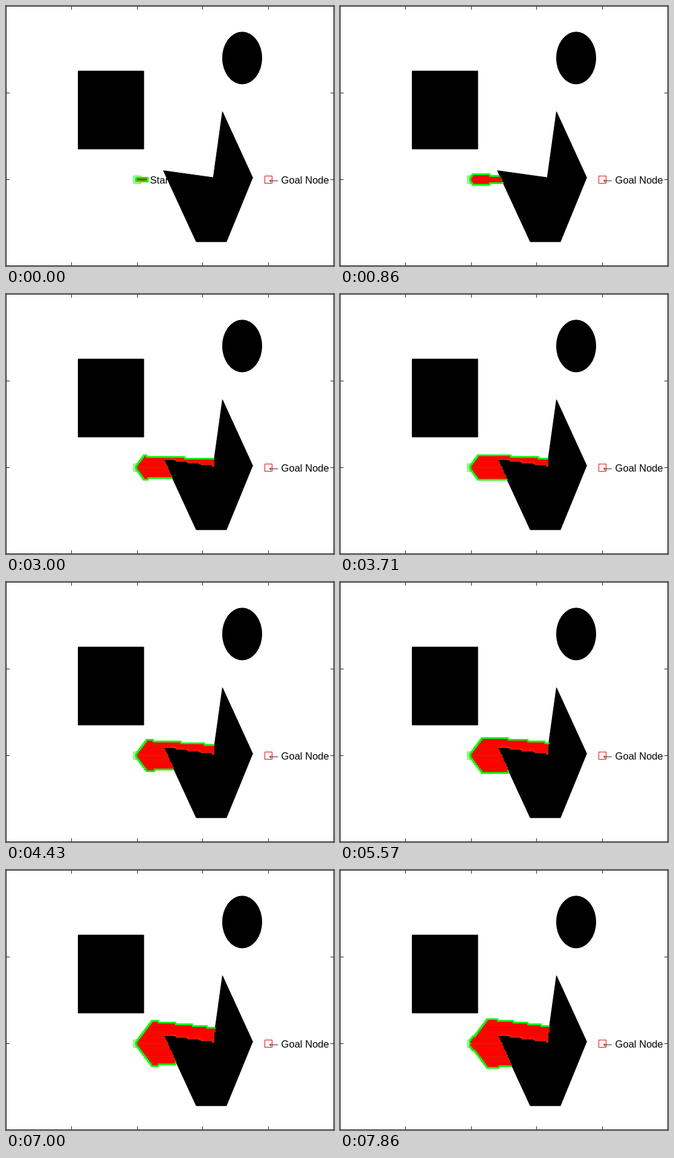
Recreate the animation shown at these times as an HTML page with a canvas. Size 543 by 429 pixels, loop 8 s.

```html
<!DOCTYPE html>
<html>
<head>
<meta charset="utf-8">
<style>
  html, body { margin: 0; width: 100%; height: 100%; overflow: hidden; background: #fff; }
  canvas { display: block; }
</style>
</head>
<body>
<canvas id="stage" width="543" height="429"></canvas>
<script>
const ctx = document.getElementById('stage').getContext('2d');
const W = 543, H = 429, COLS = 250, ROWS = 150;
const LOOP = 8000, FPS = 7, FIRST_NODES = 8, NODES_PER_SECOND = 100;
const RED = '#f00', GREEN = '#0f0', INK = '#262626';
const start = [100, 50], goal = [200, 50];

// The concave obstacle as two convex parts, clockwise with y up.
const parts = [
  [[120, 55], [158, 51], [168, 14], [145, 14]],
  [[158, 51], [165, 89], [188, 51], [168, 14]]
];

const px = x => x * W / COLS;
const py = y => H - y * H / ROWS;

function blocked(x, y) {
  return parts.some(part => part.every(([ax, ay], i) => {
    const [bx, by] = part[(i + 1) % part.length];
    return (bx - ax) * (y - ay) - (by - ay) * (x - ax) < 0;
  }));
}

// A* on an 8-connected grid with unit step cost; returns nodes in order of
// expansion, each with the neighbours it discovers.
function search(limit) {
  const makeNode = (x, y, g) =>
    ({ x, y, g, f: g + Math.hypot(goal[0] - x, goal[1] - y), found: [] });
  const root = makeNode(...start, 0);
  const seen = new Map([[start.join(), root]]);
  const open = [root], expanded = [];
  while (open.length && expanded.length < limit) {
    let best = 0;
    open.forEach((n, i) => { if (n.f < open[best].f - 1e-9) best = i; });
    const node = open.splice(best, 1)[0];
    expanded.push(node);
    for (let dx = -1; dx <= 1; dx++) {
      for (let dy = -1; dy <= 1; dy++) {
        const x = node.x + dx, y = node.y + dy, key = x + ',' + y;
        if (blocked(x, y)) continue;
        const next = makeNode(x, y, node.g + 1);
        const known = seen.get(key);
        if (!known) {
          seen.set(key, next);
          open.push(next);
          node.found.push(next);
        } else if (next.g < known.g) {
          known.g = next.g;
          known.f = next.f;
        }
      }
    }
  }
  return expanded;
}

function line(...points) {
  ctx.beginPath();
  points.forEach(([x, y]) => ctx.lineTo(x, y));
  ctx.stroke();
}

function drawAxes() {
  ctx.strokeStyle = INK;
  ctx.lineWidth = 1;
  ctx.strokeRect(0.5, 0.5, W - 1, H - 1);
  for (let x = 50; x < COLS; x += 50) {
    const tx = Math.floor(px(x)) + 0.5;
    line([tx, 0], [tx, 6]);
    line([tx, H - 6], [tx, H]);
  }
  for (let y = 50; y < ROWS; y += 50) {
    const ty = py(y) + 0.5;
    line([0, ty], [6, ty]);
    line([W - 6, ty], [W, ty]);
  }
}

function drawLabel([x, y], text, color) {
  const cx = Math.floor(px(x)) + 0.5, cy = py(y) + 0.5;
  ctx.strokeStyle = color;
  ctx.strokeRect(cx - 6, cy - 6, 12, 12);
  ctx.strokeStyle = '#000';
  ctx.lineWidth = 0.8;
  line([cx + 2, cy + 2], [cx + 15.5, cy + 2]);
  line([cx + 4.5, cy - 0.5], [cx + 2, cy + 2], [cx + 4.5, cy + 4.5]);
  ctx.lineWidth = 1;
  ctx.fillStyle = '#000';
  ctx.font = '16.6px "Liberation Sans", Arial, sans-serif';
  ctx.fillText(text, cx + 21, cy + 6.5);
}

function drawObstacles() {
  ctx.fillStyle = ctx.strokeStyle = '#000';
  ctx.beginPath();
  ctx.rect(px(55), py(112.5), px(50), py(67.5) - py(112.5));
  ctx.fill();
  ctx.stroke();
  ctx.beginPath();
  ctx.ellipse(px(180), py(120), px(15), H - py(15), 0, 0, 2 * Math.PI);
  ctx.fill();
  ctx.stroke();
  for (const part of parts) {
    ctx.beginPath();
    part.forEach(([x, y]) => ctx.lineTo(px(x), py(y)));
    ctx.closePath();
    ctx.fill();
    ctx.stroke();
  }
}

function dot({ x, y }, color) {
  ctx.fillStyle = color;
  ctx.beginPath();
  ctx.arc(px(x), py(y) + 0.3, 1.8, 0, 2 * Math.PI);
  ctx.fill();
}

function draw(count) {
  ctx.fillStyle = '#fff';
  ctx.fillRect(0, 0, W, H);
  drawAxes();
  drawLabel(start, 'Start Node', GREEN);
  drawLabel(goal, 'Goal Node', RED);
  drawObstacles();
  for (const node of nodes.slice(0, count)) {
    dot(node, RED);
    node.found.forEach(n => dot(n, GREEN));
  }
}

const nodes = search(FIRST_NODES + NODES_PER_SECOND * LOOP / 1000);
const origin = performance.now();
let shown = -1;

function tick() {
  const time = Math.max(0, performance.now() - origin) % LOOP;
  const step = Math.floor((time + 3) * FPS / 1000);
  if (step !== shown) {
    shown = step;
    draw(FIRST_NODES + Math.floor(step * NODES_PER_SECOND / FPS));
  }
  requestAnimationFrame(tick);
}
tick();
</script>
</body>
</html>
```
